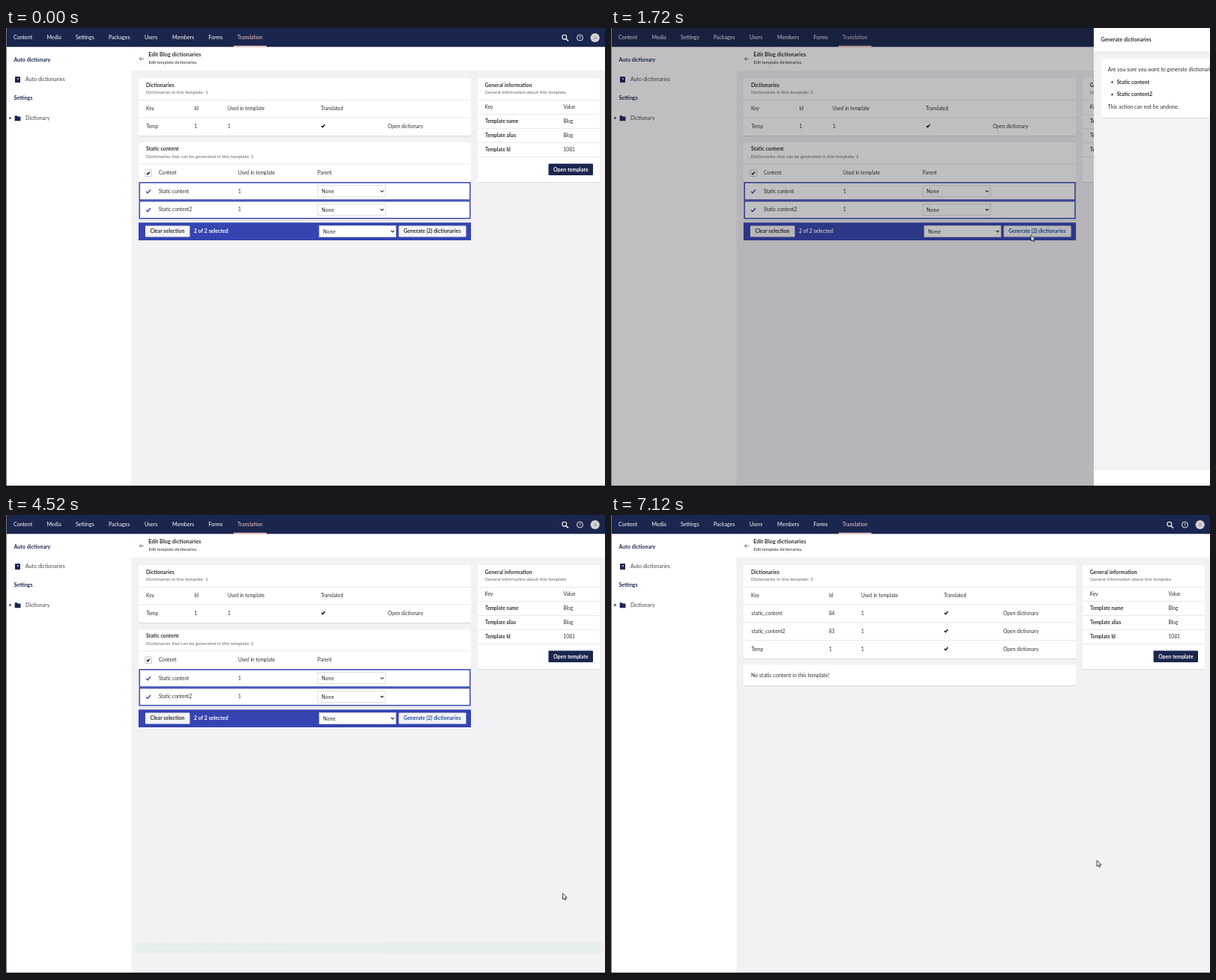
Write an HTML page that moves like this. It is 800 px wide and 614 px high and loops after 7200 ms.

```html
<!DOCTYPE html>
<html lang="en">
<head>
<meta charset="utf-8">
<title>Generate dictionaries</title>
<style>
  html, body { margin: 0; width: 100%; height: 100%; overflow: hidden; background: #f2f1f4; }
  svg { display: block; width: 100%; height: 100%; }
  text { font: 7px Lato, sans-serif; white-space: pre; }
</style>
</head>
<body>
<svg id="stage" viewBox="0 0 800 614"></svg>
<script>
const NAVY = '#1b264f', BLUE = '#3544b1', INK = '#303033', GREY = '#68676b', LINE = '#e9e9eb', GREEN = '#2bc37c';

// Text is placed by its left edge and the middle of its capitals.
const text = (x, y, s, { size = 6.65, color = INK, bold = false, id = '' } = {}) =>
  `<text ${id && `id="${id}"`} x="${x}" y="${y + size * .36}" fill="${color}" style="font-size:${size}px;font-weight:${bold ? 700 : 400}">${s}</text>`;
const title = (x, y, s, color = INK) => text(x, y, s, { size: 7.05, bold: true, color });
const body = (x, y, s, color = INK) => text(x, y, s, { size: 7.05, color });
const note = (x, y, s) => text(x, y, s, { size: 6.2, color: GREY });
const rect = (x, y, w, h, fill, extra = '') =>
  `<rect x="${x}" y="${y}" width="${w}" height="${h}" fill="${fill}" ${extra}/>`;
const path = (d, stroke, width = 1, fill = 'none') =>
  `<path d="${d}" fill="${fill}" stroke="${stroke}" stroke-width="${width}"/>`;
const rule = (x, y, w) => rect(x, y, w, 1, LINE);
const card = (x, y, w, h) =>
  rect(x, y + 1, w, h, '#d9d8dc', 'rx="1.5"') + rect(x, y, w, h, '#fff', 'rx="1.5"');
const group = (id, content) => `<g id="${id}">${content}</g>`;
const cells = (xs, y, values) => values.map((v, i) => text(xs[i], y, v)).join('');
const tick = (x, y, color, s = 1) =>
  path(`M${x - 2.6 * s} ${y}l${1.9 * s} ${1.9 * s}l${3.5 * s} ${-4.2 * s}`, color, 1.4);
const select = (x, y, w, h) =>
  rect(x, y, w, h, '#fff', 'stroke="#d8d7d9" stroke-width=".8"') + body(x + 5, y + h / 2, 'None') +
  path(`M${x + w - 6.5} ${y + h / 2 - 1}l2 2l2-2`, INK, 1.1);
const button = (x, y, w, h, label, fill, color, id) =>
  rect(x, y, w, h, fill, 'rx="1.2"') + text(x + 6.5, y + h / 2 - .2, label, { size: 7, bold: true, color, id });

function topBar() {
  const tabs = [['Content', 10], ['Media', 54.5], ['Settings', 93], ['Packages', 137], ['Users', 185],
    ['Members', 222], ['Forms', 270.5], ['Translation', 309]];
  return rect(0, 0, 800, 25.5, NAVY) +
    tabs.map(([s, x]) => body(x, 12.6, s, s === 'Translation' ? '#f5c9bf' : '#fff')).join('') +
    rect(304, 23.7, 44, 2, '#f5c1bc') +
    '<circle cx="745.8" cy="12.2" r="2.9" fill="none" stroke="#fff" stroke-width="1.1"/>' +
    path('M748 14.4l3 3', '#fff', 1.4) +
    '<circle cx="766.5" cy="13" r="4" fill="none" stroke="#fff" stroke-width=".9"/>' +
    text(764.9, 13, '?', { size: 6.2, color: '#fff', bold: true }) +
    '<circle cx="786.7" cy="13" r="6.1" fill="#d4d1d5"/>' +
    text(784.9, 13, 'A', { size: 5.5, color: GREY });
}

function sidebar() {
  return rect(0, 25.5, 167.5, 587, '#fff') +
    title(10.5, 42, 'Auto dictionary', NAVY) + title(10.5, 93.7, 'Settings', NAVY) +
    rect(12, 65, 7, 8, NAVY, 'rx=".8"') + rect(15, 67, 2, 2, '#aab') +
    body(26, 68.8, 'Auto dictionaries', '#45464d') +
    path('M4.5 118.6l2.8 2l-2.8 2z', 'none', 0, INK) +
    path('M11.7 117.3h3l1 1.2h3.8v5.8h-7.8z', 'none', 0, NAVY) +
    body(26, 120.5, 'Dictionary', '#45464d');
}

function infoCard() {
  const rows = [['Template name', 'Blog', 125], ['Template alias', 'Blog', 144], ['Template Id', '1081', 163]];
  return card(630, 67, 163, 139) + title(639.5, 76.2, 'General information') +
    note(639.5, 86, 'General information about this template') +
    rule(630, 96, 163) + text(639.5, 105.7, 'Key') + text(744.5, 105.7, 'Value') +
    rows.map(([key, value, y]) => rule(630, y - 10, 163) +
      text(640, y, key, { bold: true, size: 6.55 }) + text(744.5, y, value)).join('') +
    rule(630, 172, 163) + button(724.5, 181.5, 59.5, 15.5, 'Open template', NAVY, '#fff');
}

function dictionaryCard(xs, rows) {
  return card(177, 67, 444, 29 + 24 * (rows.length + 1)) + title(187, 76.2, 'Dictionaries') +
    note(187, 86, `Dictionaries in this template: ${rows.length}`) + rule(177, 96, 444) +
    cells(xs, 108, ['Key', 'Id', 'Used in template', 'Translated']) +
    rows.map(([key, id], i) => {
      const y = 131.8 + 24 * i;
      return rule(177, y - 12.5, 444) + text(187.5, y, key) + text(xs[1], y, id) + text(xs[2], y, '1') +
        tick(xs[3] + 3, y - .8, '#111', .85) + text(xs[4], y, 'Open dictionary');
    }).join('');
}

function staticCard() {
  const xs = [204, 310, 416];
  const row = (y, name) => rect(178.3, y - 11.7, 441.5, 23.2, '#fff', `stroke="${BLUE}" stroke-width="1.5"`) +
    tick(190, y + .2, BLUE, 1.05) + cells(xs, y - .2, [name, '1']) + select(416.3, y - 7.7, 90.5, 15);
  return card(177, 153, 444, 104) + title(187, 161.8, 'Static content') +
    note(187, 171.6, 'Dictionaries that can be generated in this template: 2') + rule(177, 181.5, 444) +
    rect(185.7, 189.7, 8.8, 8.8, '#fff', 'stroke="#bbb" stroke-width=".8" rx="1"') + tick(189.8, 194.2, '#111', .75) +
    cells(xs, 194, ['Content', 'Used in template', 'Parent']) +
    row(218.5, 'Static content') + row(243.2, 'Static content2') +
    rect(177, 260.3, 444, 23.7, BLUE) +
    button(186, 264.5, 59.5, 15, 'Clear selection', '#f3f3f5', INK) +
    title(251, 271.8, '2 of 2 selected', '#fff') + select(418.3, 264.5, 102.5, 15) +
    button(524.5, 264.5, 90, 15, 'Generate (2) dictionaries', '#f3f3f5', INK, 'generate');
}

function confirmBox() {
  return card(579, 41.5, 214, 78.5) + body(588, 55.5, 'Are you sure you want to generate dictionaries for:') +
    ['Static content', 'Static content2'].map((s, i) =>
      `<circle cx="594" cy="${72.5 + 16.5 * i}" r="1.2" fill="${INK}"/>` + title(600, 72.2 + 16.5 * i, s)).join('') +
    body(588, 105.5, 'This action can not be undone.');
}

function progressBox() {
  return card(579, 41.5, 214, 63.5) + '<circle cx="686" cy="63.7" r="11.2" fill="#000"/>' +
    path('M677 59l2-4l5-2l3 1l-2 3l1 2l-4 3l-2 3l4 1l2 3l-3 6l-3-5l-2-3zM689 55l4 1l3 5l-3-1l-2 2l-3-2zM690 63l5 1l0 4l-3 4l-2-5z', 'none', 0, '#fff') +
    text(624, 83.8, 'Generating dictionaries.. Static content', { size: 7.05, id: 'progressLabel' }) +
    rect(588, 92.6, 196, 3.4, '#d8d7d9', 'rx="1.7"') + rect(588, 92.6, 0, 3.4, BLUE, 'rx="1.7" id="progressBar"');
}

const page = content => topBar() + sidebar() + rect(167.5, 25.5, 633, 31.5, '#fff') +
  path('M184 41.3h-5.6m2.4-2.4l-2.4 2.4l2.4 2.4', GREY, .9) +
  text(190.3, 35.7, 'Edit Blog dictionaries', { size: 7.45, bold: true }) +
  text(190.5, 46.3, 'Edit template dictionaries.', { size: 5.7 }) + infoCard() + content;

const stage = document.getElementById('stage');
stage.innerHTML =
  rect(0, 0, 800, 614, '#f2f1f4') +
  group('before', page(dictionaryCard([187, 251.5, 296, 420.5, 510], [['Temp', 1]]) + staticCard())) +
  group('after', page(
    dictionaryCard([187, 291, 334, 444.5, 524], [['static_content', 84], ['static_content2', 83], ['Temp', 1]]) +
    card(177, 200.5, 444, 27.5) + body(187, 214, 'No static content in this template!'))) +
  group('blank', rect(0, 0, 800, 614, '#f2f0f5') + rect(0, 603, 267, 10, '#dde0e9', 'rx="1"') +
    text(2.5, 608.5, 'Väntar på minserver...', { size: 5.5, color: '#555' })) +
  group('toast', rect(173, 572, 624, 14, GREEN, 'rx="1.5"') +
    text(183, 579, 'Dictionaries generated: The dictionaries were successfully generated', { color: '#fff' })) +
  rect(0, 0, 800, 614, '#15151c', 'id="backdrop"') +
  group('panel', rect(569.5, 0, 231, 614, '#f3f2f5') + rect(569.5, 0, 231, 31.5, '#fff') + rule(569.5, 31.5, 231) +
    title(578.8, 15.5, 'Generate dictionaries') + group('confirm', confirmBox()) + group('progress', progressBox()) +
    rect(569.5, 590.5, 231, 23, '#fff') + rule(569.5, 590, 231) + body(730.5, 602, 'Close') +
    rect(758, 595, 35, 14.5, GREEN, 'rx="1.2" id="submit"') + title(764.5, 602.2, 'Submit', '#fff')) +
  rect(0, 0, 1, 614, '#77777c') + rect(0, 612.3, 800, 1.7, '#08080c') +
  group('cursor', path('M0 0v8l1.9-1.7l1.3 2.8l1.4-.6l-1.3-2.7h2.5z', '#111', .8, '#fff'));

const $ = id => document.getElementById(id);
const show = (id, on) => $(id).style.display = on ? '' : 'none';
const ramp = (t, from, to) => Math.min(1, Math.max(0, (t - from) / (to - from)));
const easeOut = u => 1 - (1 - u) ** 3;
const easeInOut = u => u * u * (3 - 2 * u);

// Time, x, y of the pointer tip.
const cursorPath = [[700, 640, 616], [1350, 561, 277], [1800, 561, 277], [2280, 575, 271], [3000, 775, 587],
  [4100, 775, 587], [4520, 743.5, 506], [5300, 670, 470], [6700, 670, 470], [7080, 649, 462]];

function cursorAt(t) {
  const next = cursorPath.findIndex(p => p[0] > t);
  if (next < 0) return cursorPath.at(-1).slice(1);
  const [t0, x0, y0] = cursorPath[Math.max(0, next - 1)], [t1, x1, y1] = cursorPath[next];
  const u = easeInOut(ramp(t, t0, t1));
  return [x0 + (x1 - x0) * u, y0 + (y1 - y0) * u];
}

function draw(now) {
  const t = now % 7200;
  const reload = 5800, loaded = 6700, submitted = 3240;
  show('before', t < reload);
  show('blank', t >= reload && t < loaded);
  show('after', t >= loaded);

  const open = easeOut(ramp(t, 1640, 1900)) - easeOut(ramp(t, 4120, 4360));
  show('panel', open > 0);
  $('panel').setAttribute('transform', `translate(${231 * (1 - open)} 0)`);
  $('backdrop').setAttribute('opacity', .4 * open);
  show('confirm', t < submitted);
  show('progress', t >= submitted);
  $('progressLabel').textContent = 'Generating dictionaries.. Static content' + (t < 3480 ? '' : '2');
  $('progressBar').setAttribute('width', 196 * easeInOut(ramp(t, 3550, 3950)));
  $('submit').setAttribute('fill', t > 2980 ? '#39d08b' : GREEN);
  $('generate').setAttribute('fill', t > 1300 ? '#2152a3' : INK);

  $('toast').setAttribute('opacity', t < reload ? ramp(t, 4510, 4700) : 0);
  show('cursor', t >= cursorPath[0][0]);
  $('cursor').setAttribute('transform', `translate(${cursorAt(t)})`);
  requestAnimationFrame(() => draw(performance.now()));
}
draw(0);
</script>
</body>
</html>
```
